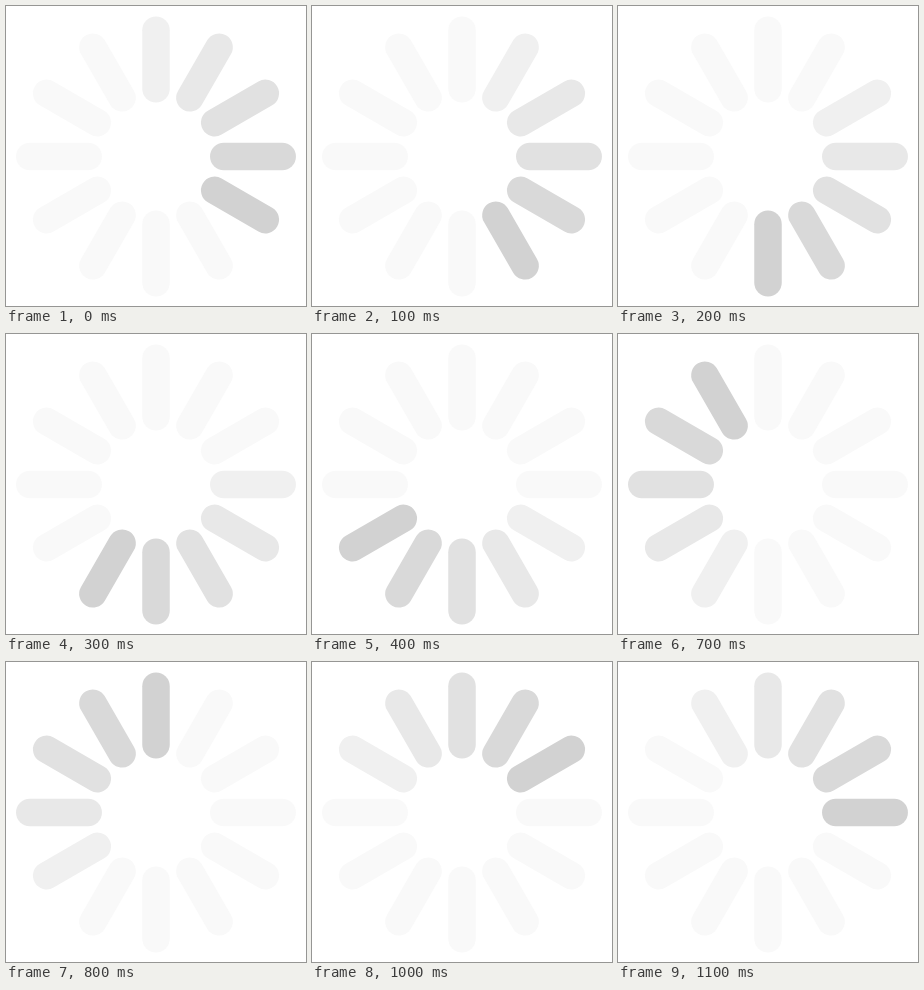
An HTML page with a canvas for the animation above (1.2 s loop, 300x300 px).

```html
<!DOCTYPE html>
<html lang="en">
<head>
<meta charset="utf-8">
<title>Spinner</title>
<style>
html, body { margin: 0; width: 100%; height: 100%; overflow: hidden; background: #fff; }
canvas { display: block; width: 300px; height: 300px; }
</style>
</head>
<body>
<canvas id="stage" width="300" height="300"></canvas>
<script>
const ctx = document.getElementById('stage').getContext('2d');
const SPOKES = 12;
const STEP = 100;
const INNER = 67.8;
const OUTER = 126.2;
const TRAIL = ['#d2d2d2', '#d9d9d9', '#e1e1e1', '#e8e8e8', '#f0f0f0'];
const REST = '#f9f9f9';

function drawSpoke(index, color) {
  const angle = index * 2 * Math.PI / SPOKES;
  const x = Math.cos(angle);
  const y = Math.sin(angle);
  ctx.strokeStyle = color;
  ctx.beginPath();
  ctx.moveTo(x * INNER, y * INNER);
  ctx.lineTo(x * OUTER, y * OUTER);
  ctx.stroke();
}

function draw(time) {
  // Index 0 points right; the head starts one spoke clockwise of it.
  const head = (Math.floor(time / STEP) + 1) % SPOKES;
  ctx.setTransform(1, 0, 0, 1, 0, 0);
  ctx.fillStyle = '#fff';
  ctx.fillRect(0, 0, 300, 300);
  ctx.translate(150, 150.5);
  ctx.lineWidth = 27.5;
  ctx.lineCap = 'round';
  for (let i = 0; i < SPOKES; i++) {
    const lag = (head - i + SPOKES) % SPOKES;
    drawSpoke(i, TRAIL[lag] || REST);
  }
}

const start = performance.now();
function tick() {
  draw(performance.now() - start);
  requestAnimationFrame(tick);
}
tick();
</script>
</body>
</html>
```
